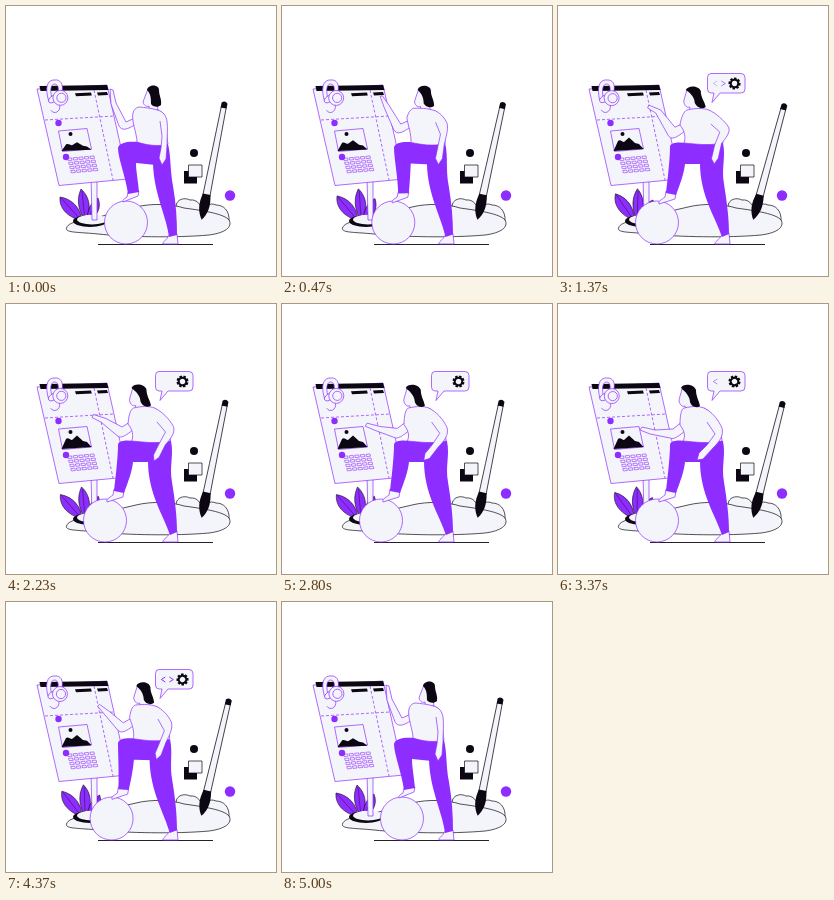
Recreate the animation shown at these times as an HTML page. Size 270 by 270 pixels, loop 5030 ms.

```html
<!DOCTYPE html>
<html lang="en">
<head>
<meta charset="utf-8">
<title>Design board</title>
<style>
html, body { margin: 0; width: 100%; height: 100%; overflow: hidden; background: #fff; }
svg { display: block; width: 100vw; height: 100vh; }
.ink { fill: #0c0712; }
.violet { fill: #8e2dff; }
.paper { fill: #f4f5fa; stroke: #8e2dff; stroke-width: .7; }
.inked { fill: #f4f5fa; stroke: #0c0712; stroke-width: .7; }
.line { fill: none; stroke: #8e2dff; stroke-width: .7; }
.leaf { fill: #8e2dff; stroke: #0c0712; stroke-width: .6; }
</style>
</head>
<body>
<svg viewBox="0 0 270 270">
  <g class="inked">
    <path d="M172 206C166 196 176 190 184 194C191 193 196 199 197 208Z"/>
    <path d="M196 210C197 200 204 196 210 199C217 199 224 204 223 216Z"/>
  </g>
  <path class="inked" d="M60.500 222C63 214 82 215 100 209C115 204 122 203 130 201C146 197 166 198 178 202C200 205 218 208 223 214C227 221 219 227 203 229C170 232 120 231 92 228C73 226 59 227 60.500 222Z"/>
  <g id="leaves">
    <path class="leaf" d="M76 215C61 211 53 202 54 191C67 193 75 203 76 215Z"/>
    <path class="leaf" d="M79 215C71 202 71 192 75 183C84 191 86 204 79 215Z"/>
    <path class="leaf" d="M81 215C81 204 85 196 92 192C96 202 91 211 81 215Z"/>
    <path d="M75 214L55 192M79 214L76 185M82 214L91 194" fill="none" stroke="#0c0712" stroke-width=".4"/>
  </g>
  <ellipse class="ink" cx="84" cy="215" rx="17" ry="6"/>
  <ellipse cx="86" cy="213.600" rx="15" ry="4.800" fill="#f4f5fa"/>
  <path class="paper" d="M85 170H91V214H86Z"/>

  <path class="paper" d="M31 83L101 79L122 173L53 179.500Z"/>
  <path class="ink" d="M33.500 80L101 79L102.500 84L34.500 85Z"/>
  <path class="line" d="M39 114L108 110M88 84L107 174" stroke-dasharray="3 2"/>
  <path class="ink" d="M69 87.300L85 86.600L85.800 89.600L70 90.300ZM91 86.500L101 86L102 89L92 89.500Z"/>
  <path class="paper" d="M52.500 125L81 122.500L85.500 143L56.500 145.500Z"/>
  <circle class="ink" cx="64.500" cy="128" r="2"/>
  <path id="hill" class="ink" d="M55.500 145L60 135C62 133 64 136 66 136L71 131.500L77 137L81 138L85.500 143Z"/>
  <g id="keys"></g>
  <circle class="violet" cx="52.500" cy="117" r="3.200"/>
  <circle class="violet" cx="60" cy="151" r="3.200"/>
  <g id="phones">
    <path class="paper" d="M42 94C39 82 41 75 47 74H51C56 75 57 80 56 85L52 86C53 80 51 78 48 78C44 79 44 86 46 94Z"/>
    <ellipse class="paper" cx="46.500" cy="93" rx="3" ry="5" transform="rotate(55 46.500 93)"/>
    <circle class="paper" cx="54" cy="92" r="7.500"/>
    <circle class="line" cx="55" cy="92" r="4.600"/>
    <path class="line" d="M53 99.500C54 106 47 109 44 104"/>
  </g>

  <circle class="ink" cx="188" cy="147" r="4"/>
  <path class="ink" d="M178 165H191V177.500H178Z"/>
  <path class="inked" d="M182.500 159H196V171H182.500Z"/>
  <circle class="violet" cx="224" cy="189.500" r="5.200"/>
  <g id="brush">
    <path class="inked" d="M-2.500-108H2.500L3.200-48L3.600-17H-3.600L-3.200-48Z"/>
    <path class="ink" d="M-3-107V-112Q0-115 3-112V-107Z"/>
    <path class="ink" d="M-3.800-19H3.800C6.500-8 5 0 0 7C-5 0-6.500-8-3.800-19Z"/>
  </g>

  <path d="M92 238.500H207" stroke="#0c0712" stroke-width=".9"/>
  <circle id="ball" class="paper" cy="216.500" r="21.500"/>
  <g id="person"></g>

  <g id="bubble">
    <path class="paper" d="M153 67.500H183Q187 67.500 187 71.500V83Q187 87 183 87H162L154 96.500L156 87H153Q149.500 87 149.500 83V71.500Q149.500 67.500 153 67.500Z"/>
    <path id="open" class="line" d="M159.300 75L155.300 77.500L159.300 80" style="stroke-width:1"/>
    <path id="close" class="line" d="M163.300 75L167.300 77.500L163.300 80" style="stroke-width:1"/>
    <g id="gear"></g>
  </g>
</svg>
<script>
const LOOP = 5030;
const $ = id => document.getElementById(id);
const svgNode = (tag, attrs, parent) => {
  const node = document.createElementNS("http://www.w3.org/2000/svg", tag);
  for (const name in attrs) node.setAttribute(name, attrs[name]);
  return parent.appendChild(node);
};
const set = (id, name, value) => $(id).setAttribute(name, value);

// Each part: class, upright pose, leaning pose, lowest reach (if it differs).
const parts = [
  // shoes
  ["paper", "M122 186L121 191C118 193 116 194 117 196L132 190L133 185Z",
    "M108 185L107 191C103 194 100 195 101 198L117 193L118 187Z"],
  ["paper", "M163 229C161 234 156 236 157 238L172 238L171 228Z",
    "M164 229C161 234 156 236 157 238L172 238L171 227Z"],
  // legs
  ["violet", "M138 137L162 138C165 150 164 165 167 180C170 197 171 214 171 229L163 231C161 212 148 188 147 158Z",
    "M136 137L165 137C168 152 163 162 166 178C169 197 171 212 171 228L164 231C158 212 142 190 142 157Z"],
  ["violet", "M132 136C124 135 113 136 112 142C112 152 120 172 122 188L133 186C132 174 130 165 130 157L150 159L158 138Z",
    "M128 137C122 136 112 136 112 141C112 152 110 170 108 187L118 189C122 178 126 168 127 158L146 158L158 138Z"],
  // front arm
  ["paper", "M129 112L120 116L110 97L107 84L104 83L105 98L113 120C116 125 121 124 130 118Z",
    "M126 117L117 121L103 103L91 98L90 101L98 106L110 129C113 134 117 133 128 124Z",
    "M125 117L115 125L97 126L84 123L82 126L92 130L112 134C116 136 121 132 128 126Z"],
  // face and neck
  ["paper", "M142 83C140 88 138 93 137 96C138 100 141 101 143 100L143 104L152 104L150 92Z",
    "M129 84C128 89 126 93 126 96C127 100 129 102 132 101L132 104L143 104L140 90Z",
    "M124 85C123 90 121 94 121 97C122 101 124 103 127 102L128 105L139 105L135 91Z"],
  // shirt
  ["paper", "M134 101C143 102 152 103 157 107C161 114 160 128 162 138C152 141 140 139 131 136C131 128 125 114 127 107C128 103 131 101 134 101Z",
    "M129 104C137 102 146 102 151 104C158 109 165 124 165 137C150 140 138 138 126 137C128 132 127 125 122 119C123 112 126 105 129 104Z",
    "M126 104C135 102 141 102 146 104C156 109 163 124 164 137C150 140 138 138 125 137C128 132 126 126 122 121C122 112 123 105 126 104Z"],
  // hair
  ["ink", "M141 84C142 78 153 78 153 84C153 90 156 93 155 99C152 102 147 101 145 98C145 93 145 88 141 84Z",
    "M128 84C130 79 141 79 143 85C143 92 147 95 148 101C144 104 139 101 137 97C137 92 133 87 128 84Z",
    "M123 84C125 79 136 80 138 86C138 93 141 96 142 102C138 105 133 102 132 98C132 93 128 88 123 84Z"],
  // back arm
  ["paper", "M154 115L156 130L155 142L153 152L156 159L160 153L161 140C161 130 162 122 161 115C160 109 157 106 152 104",
    "M153 118L162 126L157 139L154 153L157 158L161 152L164 137C168 132 173 126 171 121C166 114 158 107 151 104",
    "M149 118L157 130L149 141L141 149L139 156L145 155L155 144C161 138 166 132 164 124C160 115 154 108 146 104"]
];

const numbers = path => path.match(/[\d.]+/g).map(Number);
const limbs = parts.map(([className, up, lean, low = lean]) => {
  const node = svgNode("path", { class: className }, $("person"));
  const [a, b, c] = [up, lean, low].map(numbers);
  return (p, q) => {
    let i = 0;
    node.setAttribute("d", up.replace(/[\d.]+/g, () => {
      const value = a[i] + p * (b[i] - a[i]) + q * (c[i] - b[i]);
      i++;
      return value.toFixed(2);
    }));
  };
});

for (let row = 0; row < 4; row++) {
  for (let col = 0; col < 5; col++) {
    const x = 61.5 + col * 5.6 + row * 1.1, y = 152.3 + row * 4.1 - col * 0.5;
    svgNode("path", { class: "line", d: `M${x} ${y}l4-.4l.6 2.300l-4 .4Z`, style: "stroke-width:.6" }, $("keys"));
  }
}
for (let i = 0; i < 8; i++) {
  svgNode("rect", { class: "ink", x: -1.3, y: -6, width: 2.6, height: 2.5, transform: `rotate(${i * 45})` }, $("gear"));
}
svgNode("circle", { r: 3.7, fill: "none", stroke: "#0c0712", "stroke-width": 2 }, $("gear"));

const ease = (t, from, to) => {
  const k = Math.min(1, Math.max(0, (t - from) / (to - from)));
  return (1 - Math.cos(Math.PI * k)) / 2;
};
// Rises over the first interval, falls over the second.
const pulse = (t, a, b, c, d) => ease(t, a, b) - ease(t, c, d);

function draw(t) {
  const lean = pulse(t, 0, 1060, 3970, LOOP);
  const reach = pulse(t, 1060, 3400, 3400, LOOP);
  const sway = (1 - Math.cos(4 * Math.PI * t / LOOP)) / 2;
  const pop = pulse(t, 600, 800, 4530, 4730);

  limbs.forEach(pose => pose(lean, reach));
  set("ball", "cx", 120 - 21 * lean);
  set("hill", "transform", `translate(0 145) scale(1 ${0.65 + 0.35 * lean}) translate(0 -145)`);
  set("brush", "transform", `translate(197 207) rotate(${11.1 + 4.2 * sway})`);
  set("leaves", "transform", `rotate(${8 * sway} 79 215)`);
  set("phones", "transform", `rotate(${4 * sway - 2} 49 80)`);
  set("bubble", "opacity", pop);
  set("bubble", "transform", `translate(154 96) scale(${0.6 + 0.4 * pop}) translate(-154 -96)`);
  set("gear", "transform", `translate(176.500 77.500) rotate(${360 * t / LOOP})`);
  set("open", "opacity", 1 - pulse(t, 1080, 1550, 3050, 3650));
  set("close", "opacity", 1 - pulse(t, 1150, 1700, 3450, 3900));
}

const start = performance.now();
function tick() {
  draw((performance.now() - start) % LOOP);
  requestAnimationFrame(tick);
}
draw(0);
requestAnimationFrame(tick);
</script>
</body>
</html>
```
